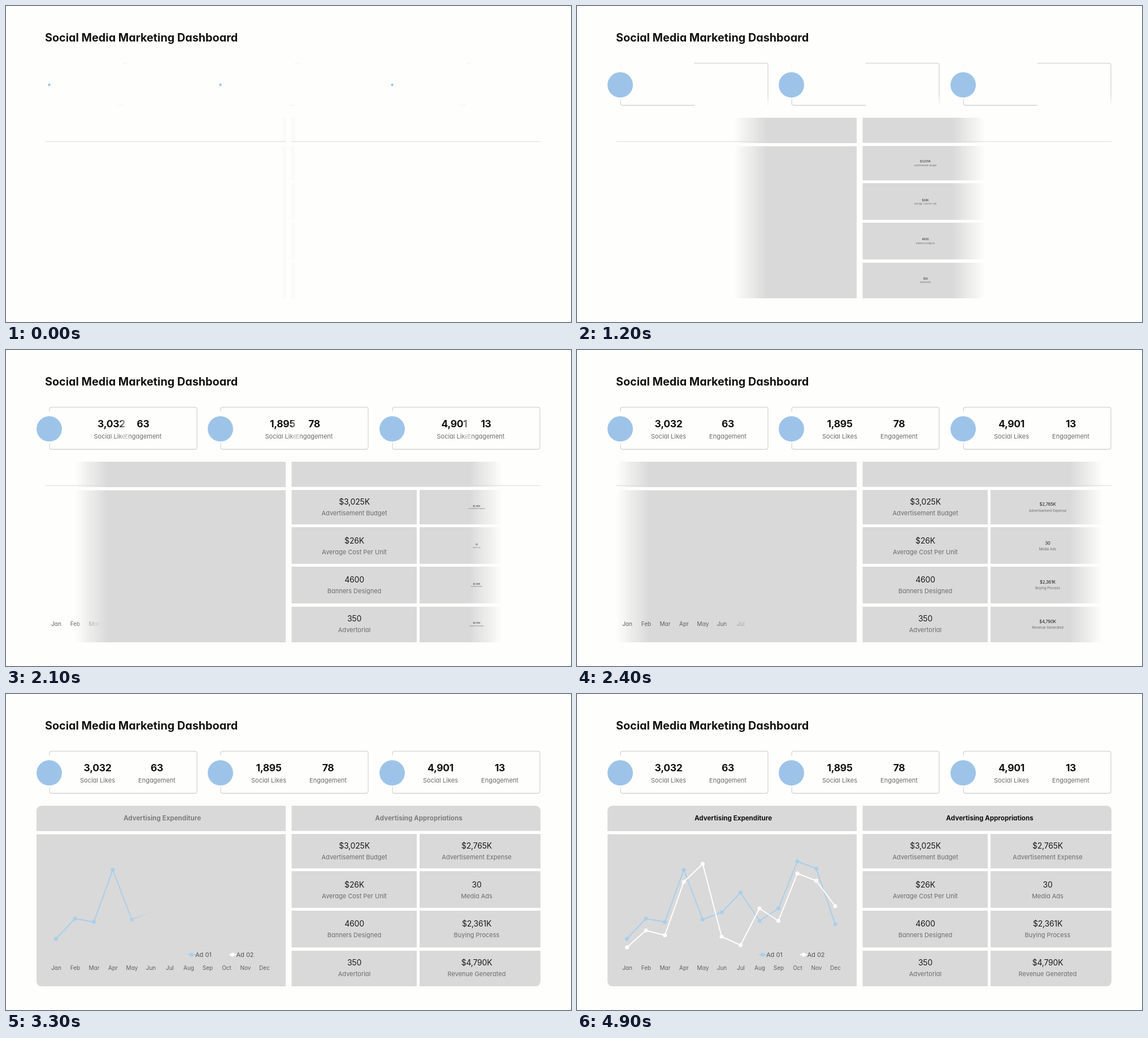
An HTML page for the animation above (5.2 s loop, 1000 by 560 pixels).

```html
<!DOCTYPE html>
<html lang="en">
<head>
<meta charset="utf-8">
<title>Social Media Marketing Dashboard</title>
<style>
html, body { margin: 0; width: 100%; height: 100%; overflow: hidden; background: #fefefd; }
#stage { position: relative; width: 1000px; height: 560px; max-height: 100%; overflow: clip; }
.layer { position: absolute; top: 0; height: 560px; overflow: hidden; }
svg { display: block; }
text { font-family: Inter, Lato, sans-serif; font-feature-settings: "cv11"; font-size: 11px; fill: #6c6c6c; text-anchor: middle; }
.title { font-size: 19.8px; font-weight: 700; fill: #111; text-anchor: start; }
.head { font-size: 11.6px; font-weight: 700; fill: #111; }
.big { font-size: 17.5px; font-weight: 700; fill: #111; letter-spacing: -.3px; }
.num { font-size: 14px; fill: #1c1c1c; letter-spacing: -.2px; }
.month { font-size: 10px; fill: #606060; }
.legend { fill: #555; text-anchor: start; }
</style>
</head>
<body>
<div id="stage"></div>
<script>
const GREY = '#d9d9d9', BLUE = '#a8cfec', ICON = '#9dc4e8';
const stage = document.getElementById('stage');
const clamp = (v, lo = 0, hi = 1) => Math.min(hi, Math.max(lo, v));
const text = (cls, x, y, s) => `<text class="${cls}" x="${x}" y="${y}">${s}</text>`;
const path = (d, style) => `<path d="${d}" ${style}/>`;

// A layer reaches from dx to the right edge of the stage; its mask uses its own pixels.
function layer(content, dx = 0) {
  const div = document.createElement('div');
  div.className = 'layer';
  div.style.left = dx + 'px';
  div.style.width = 1000 - dx + 'px';
  div.innerHTML = `<svg width="${1000 - dx}" height="560">${content}</svg>`;
  stage.append(div);
  return div;
}

const mask = (div, gradient) => { div.style.webkitMaskImage = gradient; };
// Opaque at x = solid, gone at x = clear.
function wipe(div, solid, clear) {
  mask(div, solid < clear
    ? `linear-gradient(90deg, #000 ${solid}px, transparent ${clear}px)`
    : `linear-gradient(90deg, transparent ${clear}px, #000 ${solid}px)`);
}

// Two-spoke clockwise wheel; angles are measured in a box scaled to a square.
function wheel(div, lead, soft) {
  const real = a => Math.atan2(130.5 * Math.sin(a * Math.PI / 180), 37.5 * Math.cos(a * Math.PI / 180)) * 180 / Math.PI;
  const stop = a => {
    const pos = clamp(a, 0, 180);
    return [`rgba(0,0,0,${clamp((lead - pos) / soft)})`, real(pos) + 'deg'];
  };
  const [c1, a1] = stop(lead - soft), [c2, a2] = stop(lead);
  mask(div, `repeating-conic-gradient(at 207.5px 138.8px, ${c1} 0deg, ${c1} ${a1}, ${c2} ${a2}, ${c2} 180deg)`);
}

layer(text('title', 69, 63, 'Social Media Marketing Dashboard') +
  path('M69 240.2H495M505 240.2H946', 'stroke="#dadada"'));

const cards = [[0, '3,032', 63], [303, '1,895', 78], [607, '4,901', 13]].map(([dx, likes, engaged]) => ({
  frame: layer(path('M77 109V105Q77 101.3 81 101.3H334Q338 101.3 338 105V172Q338 176 334 176H81Q77 176 77 172V165',
    'fill="none" stroke="#d4d4d4" stroke-width="1.3"'), dx),
  left: layer('<g>' + text('big', 162, 137, likes) + text('', 162, 157, 'Social Likes') + '</g>', dx),
  right: layer('<g>' + text('big', 267, 137, engaged) + text('', 267, 157, 'Engagement') + '</g>', dx),
  icon: layer(`<circle cx="76.5" cy="139.8" fill="${ICON}"/>`, dx).querySelector('circle')
}));

const panelL = layer(path('M495 198V243H54V208Q54 198 64 198ZM54 248.5H495V518H64Q54 518 54 508Z', `fill="${GREY}"`));
const rows = [[248, 309], [314, 379], [384, 449], [455, 518]];
const cells = rows.map(([a, b], i) => `M505.5 ${a}H727V${b}H505.5ZM732 ${a}H946` +
  (i < 3 ? `V${b}H732Z` : `V${b - 10}Q946 ${b} 936 ${b}H732Z`)).join('');
const panelR = layer(path('M505.5 198H936Q946 198 946 208V242.5H505.5Z' + cells, `fill="${GREY}"`));

const heads = layer(text('head', 276.5, 224, 'Advertising Expenditure') +
  text('head', 730.5, 224, 'Advertising Appropriations'));

const centers = [279, 347.5, 416.8, 486.3];
function column(x, entries) {
  const div = layer(entries.map(([num, label], i) =>
    `<g data-at="${x},${centers[i]}">${text('num', 0, -5, num)}${text('', 0, 14, label)}</g>`).join(''));
  return [...div.querySelectorAll('g')];
}
const columns = [
  column(616.5, [['$3,025K', 'Advertisement Budget'], ['$26K', 'Average Cost Per Unit'],
    ['4600', 'Banners Designed'], ['350', 'Advertorial']]),
  column(833, [['$2,765K', 'Advertisement Expense'], ['30', 'Media Ads'],
    ['$2,361K', 'Buying Process'], ['$4,790K', 'Revenue Generated']])
];

const monthX = i => 88.5 + 33.5 * i;
const key = (x, color, label) => path(`M${x} 462h13`, `stroke="${color}" stroke-width="2"`) +
  `<circle cx="${x + 6}" cy="462" r="3.6" fill="${color}"/>` + text('legend', x + 12.5, 466, label);
const axis = layer('Jan Feb Mar Apr May Jun Jul Aug Sep Oct Nov Dec'.split(' ')
  .map((m, i) => text('month', monthX(i) + .5, 488.5, m)).join('') +
  key(322.5, BLUE, 'Ad 01') + key(395, '#fff', 'Ad 02'));

function series(color, ys) {
  const points = ys.map((y, i) => [monthX(i), y]);
  return layer(path('M' + points.join('L'), `fill="none" stroke="${color}" stroke-width="2" stroke-linejoin="round"`) +
    points.map(([x, y]) => `<circle cx="${x}" cy="${y}" r="3.5" fill="${color}"/>`).join(''));
}
const line1 = series(BLUE, [434, 398, 404, 311.5, 399.5, 387, 352, 402, 380, 296.5, 309.5, 408]);
const line2 = series('#fff', [449, 419, 427.5, 333, 301, 430, 445, 380, 402, 318, 331, 376]);

function draw(t) {
  const slide = clamp(24.5 + (2100 - t) * .089, 0, 110);
  for (const { frame, left, right, icon } of cards) {
    icon.setAttribute('r', 22.5 * clamp(.1 + t * .00104));
    wheel(frame, 7 + .108 * t, 22);
    left.querySelector('g').setAttribute('transform', `translate(${slide})`);
    right.querySelector('g').setAttribute('transform', `translate(${-slide})`);
    wipe(left, 200, 216);
    wipe(right, 220, 206);
  }

  const spread = 14 + .1735 * t;
  wipe(panelL, 558 - spread, 500 - spread);
  wipe(panelR, 442 + spread, 500 + spread);

  columns.forEach((groups, i) => {
    const scale = clamp((t - 855 - 1005 * i) / 1000);
    for (const g of groups) g.setAttribute('transform', `translate(${g.dataset.at}) scale(${scale})`);
  });

  const lead = 172 + .467 * (t - 2100);
  wipe(axis, lead - 55, lead);
  heads.style.opacity = clamp((t - 2850) / 1000);

  [[line1, 109 + .355 * (t - 3000)], [line2, 207 + .355 * (t - 4200)]]
    .forEach(([div, solid]) => wipe(div, solid, solid + 41));
}

function tick() {
  // The animation advances in 100 ms steps and rests on the last one.
  draw(Math.min(4900, Math.floor(performance.now() % 5200 / 100) * 100));
  requestAnimationFrame(tick);
}
tick();
</script>
</body>
</html>
```
